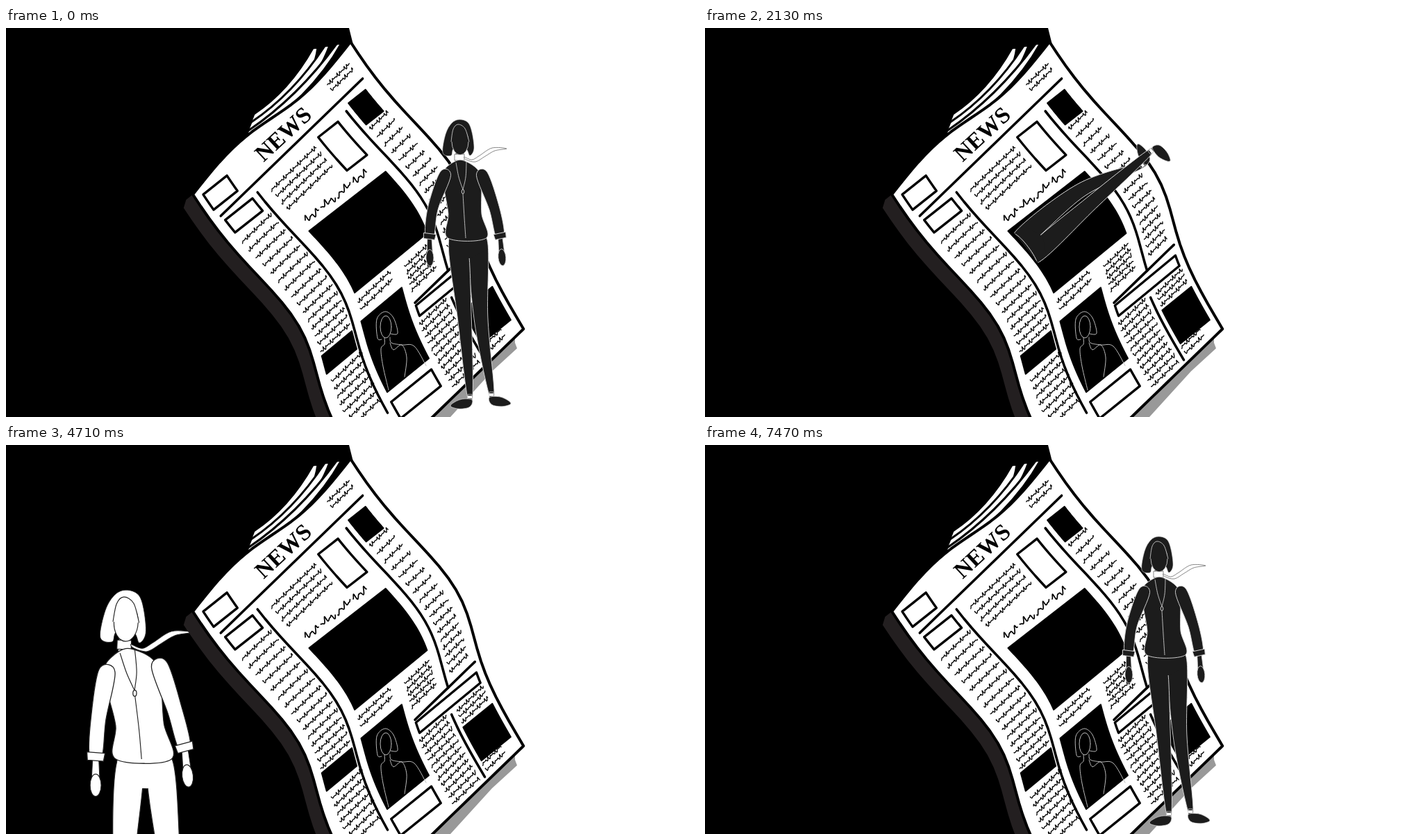
An HTML page with a canvas that plays this animation: 998x561 px, repeating every 7.5 s.

```html
<!DOCTYPE html>
<html lang="en">
<head>
<meta charset="utf-8">
<title>Through the news</title>
<style>
html, body { margin: 0; width: 100%; height: 100%; overflow: hidden; background: #fff; }
canvas { display: block; width: 100vw; height: 100vh; }
</style>
</head>
<body>
<canvas id="stage" width="998" height="561"></canvas>
<script>
const ctx = document.getElementById('stage').getContext('2d');
const LOOP = 7500, RAD = Math.PI / 180;
ctx.lineJoin = 'round';

// ---------- path helpers: points are [x, y] pairs ----------
function polygon(points, closed = true) {
  const path = new Path2D();
  points.forEach(([x, y]) => path.lineTo(x, y));
  if (closed) path.closePath();
  return path;
}

function curve(points, closed = true) {
  const n = points.length, path = new Path2D();
  const at = i => points[closed ? (i + n) % n : Math.max(0, Math.min(n - 1, i))];
  path.moveTo(...points[0]);
  for (let i = 0; i < n - (closed ? 0 : 1); i++) {
    const [a, b, c, d] = [at(i - 1), at(i), at(i + 1), at(i + 2)];
    path.bezierCurveTo(b[0] + (c[0] - a[0]) / 6, b[1] + (c[1] - a[1]) / 6,
      c[0] - (d[0] - b[0]) / 6, c[1] - (d[1] - b[1]) / 6, c[0], c[1]);
  }
  return path;
}

function oval(x, y, rx, ry) {
  const path = new Path2D();
  path.ellipse(x, y, rx, ry, 0, 0, 2 * Math.PI);
  return path;
}

function paint(path, fill, line, width = 1) {
  if (fill) { ctx.fillStyle = fill; ctx.fill(path); }
  if (line) { ctx.strokeStyle = line; ctx.lineWidth = width; ctx.stroke(path); }
}

function turned([x, y], degrees, draw) {
  ctx.save();
  ctx.translate(x, y);
  ctx.rotate(degrees * RAD);
  draw();
  ctx.restore();
}

const span = (from, to, steps, f) =>
  Array.from({ length: steps + 1 }, (_, i) => f(from + (to - from) * i / steps));

// ---------- newspaper: u runs across the sheet, v down its bulging side ----------
function onSheet(u, v) {
  const bulge = 39 * Math.exp(-(((v - 187) / 70) ** 2) / 2);
  return [268 + 0.604 * v + bulge + 227 * u, 240 + v - 220 * u];
}
const downSheet = (u, v0, v1) => span(v0, v1, 24, v => onSheet(u, v));
const acrossSheet = (v, u0, u1) => span(u0, u1, 12, u => onSheet(u, v));

function box(u0, v0, u1, v1) {
  const slant = 25 * (u1 - u0);
  return polygon([...downSheet(u0, v0, v1), ...downSheet(u1, v1 + slant, v0 + slant)]);
}

const topEdge = span(0, 1, 24, u => {
  const [x, y] = onSheet(u, 0);
  return [x, y - 11 * Math.sin(2 * Math.PI * u)];
});
const sheet = polygon([...topEdge, ...downSheet(1, 0, 412), ...acrossSheet(414, 1, 0.3), ...downSheet(0, 414, 0)]);
const darkShadow = polygon([...downSheet(-0.07, 4, 414), ...downSheet(0.05, 414, 10), onSheet(0, 0), onSheet(-0.04, -1)]);
const greyShadow = polygon([[733, 425], [733, 454], [736, 462], [700, 495], [640, 561], [600, 561]]);
const backdrop = polygon([[0, 0], [494, 0], [500, 24], [520, 300], [520, 561], [0, 561]]);

const rules = [acrossSheet(42, 0.05, 0.95), downSheet(0.25, 52, 370), downSheet(0.8, 56, 286),
  acrossSheet(286, 0.59, 0.97), downSheet(0.77, 318, 408)].map(points => polygon(points, false));
const whiteBoxes = [[0.04, 9, 0.18, 31], [0.055, 49, 0.215, 67], [0.625, 55, 0.74, 103],
  [0.59, 290, 0.96, 305], [0.29, 363, 0.53, 387]].map(b => box(...b));
const blackBoxes = [[0.83, 51, 0.93, 82], [0.31, 121, 0.75, 210], [0.295, 248, 0.545, 350],
  [0.05, 244, 0.235, 270], [0.795, 342, 0.97, 390]].map(b => box(...b));

// Each text block: rows, left and right u, first and last v.
const textBlocks = [[2, 0.8, 0.94, 18, 26], [4, 0.305, 0.59, 61, 88], [15, 0.05, 0.235, 80, 238],
  [7, 0.065, 0.255, 284, 350], [17, 0.83, 0.945, 88, 270], [5, 0.59, 0.745, 234, 268],
  [2, 0.31, 0.51, 223, 234], [11, 0.575, 0.745, 314, 404], [3, 0.8, 0.965, 320, 336], [2, 0.79, 0.91, 394, 403]];
const scribbles = new Path2D(), headline = new Path2D();

function scribble(path, [x0, y0], [x1, y1], height, seed) {
  const length = Math.hypot(x1 - x0, y1 - y0), ux = (x1 - x0) / length, uy = (y1 - y0) / length;
  for (let d = 0; d <= length; d += 0.8) {
    const phase = d * 4 / height + seed;
    const up = height * Math.sin(phase) * (0.5 + 0.5 * Math.sin(d * 0.43 + seed * 2));
    const along = d + 0.35 * up + 0.4 * Math.cos(phase);
    const x = x0 + ux * along + uy * up, y = y0 + uy * along - ux * up;
    if (d) path.lineTo(x, y); else path.moveTo(x, y);
  }
}
for (const [rows, left, right, top, bottom] of textBlocks) {
  span(top, bottom, rows - 1, v => scribble(scribbles, onSheet(left, v), onSheet(right, v), 3, v));
}
for (let word = 0; word < 4; word++) {
  const u = 0.33 + word * 0.093;
  scribble(headline, onSheet(u, 110 + word * 2), onSheet(u + 0.08, 112 + word * 2), 6, word * 2);
}

function drawLeaves() {
  for (let k = 3; k > 0; k--) {
    const leaf = new Path2D(), [x, y] = [345 + 4 * k, 160 - 12 * k], [tipX, tipY] = [493 - 17 * k, 20 + 3 * k];
    leaf.moveTo(340, 168);
    leaf.lineTo(x, y);
    leaf.quadraticCurveTo((x + tipX) / 2 + 8, (y + tipY) / 2 + 14, tipX, tipY);
    leaf.lineTo(tipX + 7, tipY - 1);
    leaf.quadraticCurveTo(440, 100, 340, 168);
    paint(leaf, '#fff', '#000', 3);
  }
}

function drawPortrait() {
  const pen = path => paint(path, null, '#bbb', 1);
  pen(oval(547, 431, 8, 16));
  pen(curve([[541, 449], [535, 447], [534, 420], [546, 409], [558, 418], [564, 440], [554, 441]], false));
  pen(curve([[545, 447], [545, 456], [540, 463], [543, 488], [551, 522]], false));
  pen(curve([[553, 446], [555, 454], [570, 457], [588, 459], [605, 487]], false));
  pen(curve([[553, 454], [558, 464], [570, 457], [577, 475], [574, 503]], false));
}

function drawPaper() {
  paint(darkShadow, '#231f20');
  paint(greyShadow, '#999');
  drawLeaves();
  paint(sheet, '#fff', '#000', 4);
  ctx.lineCap = 'round';
  rules.forEach(rule => paint(rule, null, '#000', 3.6));
  whiteBoxes.forEach(b => paint(b, '#fff', '#000', 3.4));
  blackBoxes.forEach(b => paint(b, '#000', '#000', 2));
  drawPortrait();
  paint(scribbles, null, '#000', 1.3);
  paint(headline, null, '#000', 1.7);
  ctx.lineCap = 'butt';
  turned([371, 194], -43, () => {
    ctx.font = 'bold 33px "Liberation Serif", serif';
    ctx.fillStyle = '#000';
    ctx.fillText('NEWS', 0, 0);
  });
}

// ---------- figure: origin at the middle of the waist ----------
const NECK = 115;
const spineAt = height => -10 * height / NECK;
const torsoWidths = [[0, 27.5], [35, 24], [73, 27], [97, 25], [111, 7]];
const torso = [...torsoWidths.map(([h, w]) => [spineAt(h) - w, -h]),
  ...torsoWidths.map(([h, w]) => [spineAt(h) + w, -h]).reverse()];
const hips = polygon([[-26, 0], [27, 0], [27, 18], [4, 29], [-3, 29], [-25, 18]]);
const shoe = curve([[-3, 7], [12, 6], [25, 12], [27, 17], [14, 20], [0, 17]]);
const hair = curve([[-12, -51], [-1, -56], [11, -52], [17, -38], [20, -14], [14, -4], [8, -14],
  [-9, -14], [-13, -4], [-25, -8], [-21, -35]]);
const parting = curve([[-13, -24], [-10, -42], [-3, -49], [7, -43], [13, -24]], false);
const scarf = curve([[6, -2], [17, 2], [28, -4], [46, -15], [67, -14], [50, -11], [36, -3], [22, 5], [9, 2]]);

// Bends a point of the upper body along an arc that starts at the waist.
function bend([x, y], lean) {
  const phi = -lean * y / NECK || 1e-6, off = x - spineAt(-y);
  return [spineAt(-y) + y * (1 - Math.cos(phi)) / phi + off * Math.cos(phi),
    y * Math.sin(phi) / phi * (1 - 0.14 * lean) - off * Math.sin(phi)];
}

// Draws a tapering limb of two bones and returns its end.
function limb(start, angles, lengths, widths, look) {
  const joints = [start];
  lengths.forEach((length, i) => {
    const [x, y] = joints[i], a = angles[i] * RAD;
    joints.push([x + Math.sin(a) * length, y + Math.cos(a) * length]);
  });
  const bends = [angles[0], (angles[0] + angles[1]) / 2, angles[1]];
  const side = sign => joints.map(([x, y], i) => {
    const a = bends[i] * RAD, w = sign * widths[i] / 2;
    return [x + Math.cos(a) * w, y - Math.sin(a) * w];
  });
  paint(curve([...side(-1), ...side(1).reverse()]), look.fill, look.line, 0.9);
  return joints[2];
}

function drawArm(shoulder, [upper, fore, hand], look) {
  const wrist = limb(shoulder, [upper, fore], [53 * look.reach, 41 * look.reach], [16, 15, 12], look);
  turned(wrist, -hand, () => {
    const size = 43 * look.reach;
    paint(polygon([[-3, 0], [3, 0], [4, size * 0.55], [-4, size * 0.55]]), look.fill, look.line, 0.7);
    paint(oval(0, size * 0.72, 5.5, size * 0.28), look.fill, look.line, 0.8);
  });
  turned(wrist, -fore, () => paint(polygon([[-9, -4], [9, -4], [8, 4], [-8, 4]]), look.fill, look.line, 0.9));
}

function drawLeg(hip, angles, shin, facing, look) {
  const ankle = limb(hip, angles, [112, shin], [26, 20, 8], look);
  turned(ankle, 0, () => {
    ctx.scale(facing, 1);
    paint(polygon([[-3, -1], [3, -1], [3, 14], [-3, 14]]), look.fill, look.line, 0.7);
    ctx.fillStyle = '#fff';
    ctx.fillRect(-3, 1, 6, 4);
    paint(shoe, look.fill, look.line, 0.7);
  });
}

function drawFigure([x, y, rotation], pose, look) {
  const bent = point => bend(point, pose.lean), neck = bent([-10, -NECK]);
  const seam = points => paint(curve(points.map(bent), false), null, look.line, 0.8);
  turned([x, y], rotation, () => {
    ctx.scale(look.scale, look.scale);
    drawLeg([16, 3], pose.rightLeg, pose.shin, 1, look);
    drawLeg([-13.5, 3], pose.leftLeg, 112, -1, look);
    paint(hips, look.fill);

    turned(neck, pose.head, () => {
      paint(polygon([[-6, -12], [5, -12], [6, 9], [-7, 9]]), look.fill, look.line, 0.6);
      paint(polygon([[-8, -6], [6, -6], [6, 3], [-8, 3]]), '#fff', look.hem, 0.7);
    });
    paint(curve(torso.map(bent)), look.fill, look.line, 0.9);
    seam([[-16, -109], [-12, -88], [-6, -70]]);
    seam([[-1, -110], [-2, -88], [-6, -70]]);
    seam([[-6, -64], [-4, -30], [-2, 0]]);
    paint(oval(...bent([-6, -67]), 1.8, 3), look.fill, look.line, 0.9);
    drawArm(bent([-31, -93]), pose.leftArm, look);
    drawArm(bent([21, -93]), pose.rightArm, look);

    turned(neck, pose.scarf, () => paint(scarf, '#fff', look.hem, 0.7));
    turned(neck, pose.head, () => {
      paint(hair, look.fill, look.line, 0.6);
      paint(oval(0, -24, 12, 19), look.fill, look.line, 0.8);
      paint(parting, look.fill, look.line, 0.8);
    });
  });
}

// ---------- motion ----------
const smooth = u => u * u * (3 - 2 * u);

// Blends numbers, lists and objects alike.
function mix(a, b, u) {
  if (typeof a === 'number') return a + (b - a) * u;
  if (Array.isArray(a)) return a.map((v, i) => mix(v, b[i], u));
  return Object.fromEntries(Object.keys(a).map(key => [key, mix(a[key], b[key], u)]));
}

function track(keys, t, ease = u => u) {
  const next = keys.findIndex(([time]) => time > t);
  if (next < 1) return keys[next < 0 ? keys.length - 1 : 0][1];
  const [t0, a] = keys[next - 1], [t1, b] = keys[next];
  return mix(a, b, ease((t - t0) / (t1 - t0)));
}

const stand = { lean: 0, head: 0, scarf: 0, shin: 109,
  leftArm: [-20, -7, 1], rightArm: [20, 12, 5], leftLeg: [5, 4], rightLeg: [2, 8] };
const peek = { ...stand, lean: 0.49, head: -10, scarf: -28,
  leftArm: [1, -20, -64], rightArm: [33, 19, 15], rightLeg: [2, -8] };
const crouch = { ...stand, lean: 1.5, head: -26, scarf: -25, shin: 92,
  leftArm: [14, -32, -76], rightArm: [67, 26, -6], rightLeg: [2, -15] };
const stoop = mix(peek, crouch, 0.7);
const dive = { ...crouch, lean: 0, head: 0, leftArm: [-150, -170, -175], rightArm: [150, 170, 175] };
const facing = { ...stand, lean: 0.15, head: -2, leftArm: [-10, -4, 0], rightArm: [19, 15, 6],
  leftLeg: [-3, 4], rightLeg: [6, 8] };

const blackPoses = [[30, stand], [660, peek], [1080, peek], [1830, crouch], [5340, stoop],
  [6120, stoop], [6480, peek], [6900, peek], [7470, stand]];
const whitePoses = [[2820, { ...facing, rightLeg: [8, 8] }], [3390, facing], [3720, { ...facing, head: 7 }],
  [3870, { ...facing, head: 7 }], [4380, { ...facing, head: 2 }]];

// Waist position and rotation from standing (0) to gone through the photo (1).
const leap = [[0, [664, 303, 0]], [0.25, [655, 215, -52]], [0.45, [550, 235, -100]],
  [0.66, [463, 318, -127]], [1, [250, 478, -127]]];
const whiteSpot = [198, 453, 0];
const whitePath = [[2200, [700, 330, -100]], [2640, [270, 385, -32]], [2800, whiteSpot], [4710, whiteSpot],
  [4900, [225, 465, 25]], [5100, [430, 440, 70]], [5310, [800, 400, 80]]];

const blackLook = { fill: '#1c1c1c', line: '#ddd', hem: '#555', scale: 1, reach: 1 };
const whiteLook = { fill: '#fff', line: '#222', hem: '#222', scale: 1.45, reach: 0.92 };
const beforePhoto = polygon([[213, 0], [441, 290], [505, 371], [505, 561], [998, 561], [998, 0]]);

function clipped(region, draw) {
  ctx.save();
  ctx.clip(region);
  draw();
  ctx.restore();
}

function drawBlack(t) {
  const gone = Math.max(0, t < 4000 ? (t - 1840) / 440 : (6090 - t) / 840);
  if (gone >= 1) return;
  const pose = mix(track(blackPoses, t, smooth), dive, Math.min(1, gone * 1.7));
  clipped(beforePhoto, () => drawFigure(track(leap, gone), pose, blackLook));
}

function drawWhite(t) {
  if (t < 2200 || t > 5310) return;
  clipped(backdrop, () => drawFigure(track(whitePath, t), track(whitePoses, t, smooth), whiteLook));
}

function frame() {
  const t = performance.now() % LOOP;
  ctx.fillStyle = '#fff';
  ctx.fillRect(0, 0, 998, 561);
  paint(backdrop, '#000');
  drawWhite(t);
  drawPaper();
  drawBlack(t);
  requestAnimationFrame(frame);
}
frame();
</script>
</body>
</html>
```
